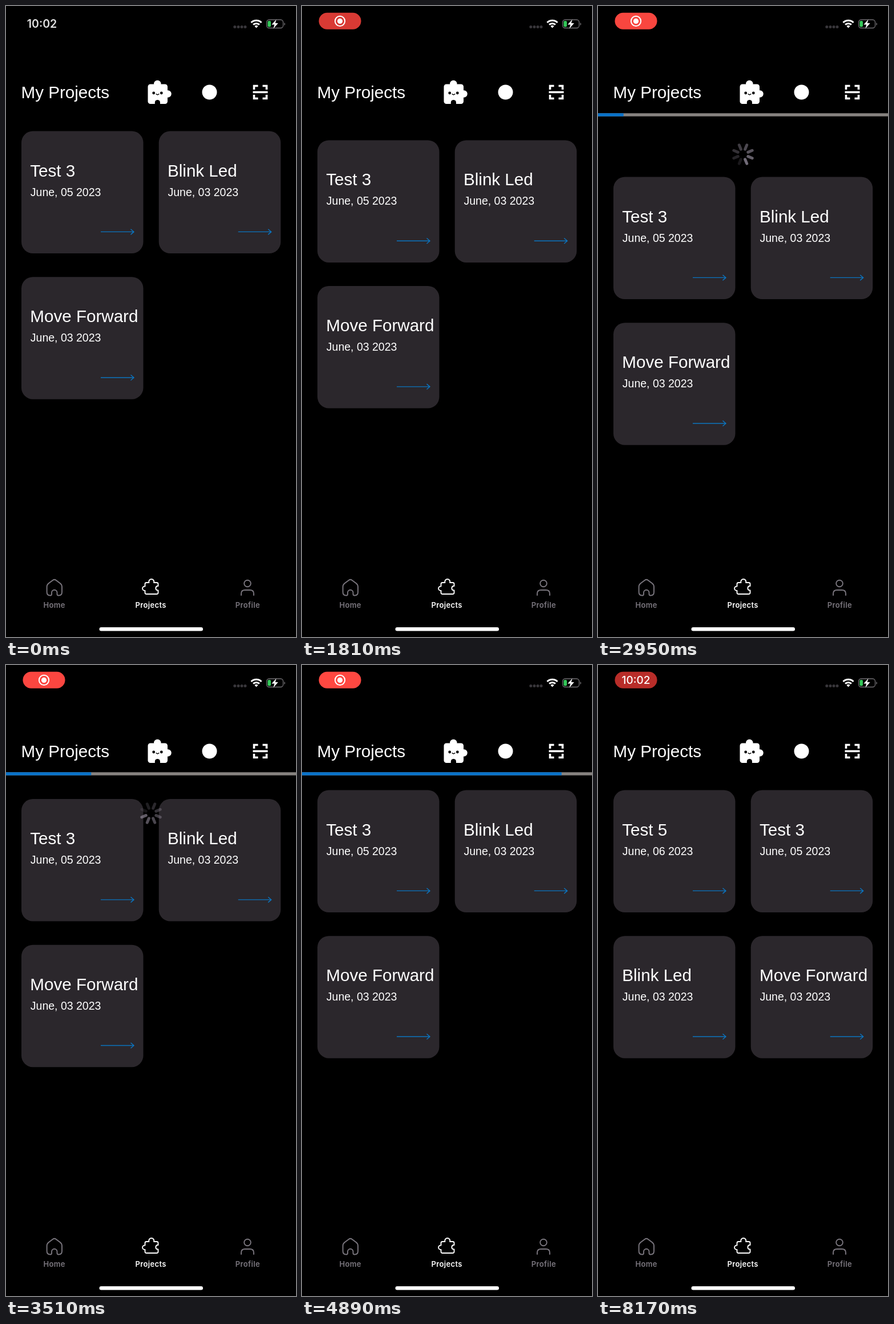
Recreate the animation shown at these times as an HTML page. Size 508 by 1102 pixels, loop 8.22 s.

```html
<!DOCTYPE html>
<html lang="en">
<head>
<meta charset="utf-8">
<title>Project list refresh</title>
<style>
  html, body { margin: 0; width: 100%; height: 100%; overflow: hidden; background: #000; }
  svg { display: block; width: 508px; height: 1102px; }
  text { fill: #fff; font-family: "Liberation Sans", Arial, sans-serif; }
  .title { font-size: 29.6px; }
  .date { font-size: 19.5px; }
  .time { font: 600 19.5px Inter, sans-serif; text-anchor: middle; }
  .tab { font: 600 13px Inter, sans-serif; letter-spacing: .35px; text-anchor: middle; }
  .line { fill: none; stroke: #fff; stroke-width: 1.9; stroke-linecap: round; stroke-linejoin: round; }
  .dim .line { stroke: #7b777f; }
  .dim text { fill: #7b777f; }
  .arrow { fill: none; stroke: #0b74bf; stroke-width: 1.4; }
</style>
</head>
<body>
<svg viewBox="0 0 508 1102">
  <!-- status bar -->
  <text id="clock" class="time" x="63" y="38" style="fill:#e2e2e2">10:02</text>
  <g id="pill">
    <rect id="pillBack" x="29.5" y="11.8" width="74" height="29" rx="14.5"/>
    <text id="pillTime" class="time" x="66.5" y="33.2" style="font-weight:500;font-size:19px">10:02</text>
    <g id="record">
      <circle cx="66.5" cy="26.4" r="8.6" fill="none" stroke="#fff" stroke-width="2"/>
      <circle cx="66.5" cy="26.4" r="4.6" fill="#fff"/>
    </g>
  </g>
  <path d="M400.8 36.4h.01M407 36.4h.01M413 36.4h.01M419 36.4h.01" stroke="#39373b" stroke-width="5" stroke-linecap="round"/>
  <g fill="none" stroke="#fff" stroke-width="3">
    <path d="M429.5 29a12.7 12.7 0 0 1 18 0"/>
    <path d="M433.1 32.6a7.7 7.7 0 0 1 10.8 0"/>
    <path d="M438.5 38.5l-3-3.2a4.3 4.3 0 0 1 6 0z" fill="#fff" stroke="none"/>
  </g>
  <rect x="456.5" y="24" width="29" height="14.5" rx="4.5" fill="none" stroke="#706e72" stroke-width="1.3"/>
  <path d="M487.3 29v5q1.7-.8 1.7-2.5t-1.7-2.5" fill="#706e72"/>
  <rect x="458.3" y="26" width="5.7" height="10.6" rx="2" fill="#34c759"/>
  <path d="M473.5 23.5l-8.2 9h5l-2 7 8.4-9.4h-5z" fill="#fff"/>

  <!-- header -->
  <text class="title" x="26.5" y="161">My Projects</text>
  <g fill="#fff">
    <rect x="248.5" y="136.5" width="34.5" height="34.5" rx="4.5"/>
    <circle cx="265.3" cy="136" r="6.2"/>
    <circle cx="283.5" cy="153.5" r="6.2"/>
    <circle cx="356.5" cy="150.5" r="13"/>
  </g>
  <path d="M260.8 172v-3.5a4.6 4.6 0 0 1 9.2 0v3.5z"/>
  <circle cx="258.7" cy="152" r="2.4"/><circle cx="272.3" cy="152" r="2.4"/>
  <path d="M263.2 153.8q2.3 2.4 4.6 0" fill="none" stroke="#000" stroke-width="1.5" stroke-linecap="round"/>
  <path d="M434.5 146v-6.5h7M449.5 139.5h7v6.5M434.5 155v6.5h7M449.5 161.5h7v-6.5M432.5 150.5h26" fill="none" stroke="#fff" stroke-width="3.6"/>

  <g id="list"></g>
  <g id="spinner" stroke="#8e8695" stroke-width="5" stroke-linecap="round"></g>
  <g id="progress">
    <rect y="187.3" width="508" height="5.4" fill="#86827f"/>
    <rect id="fill" y="187.3" height="5.4" fill="#0871c8"/>
  </g>

  <!-- tab bar -->
  <g class="dim">
    <path class="line" d="M80 1026v-1.5a4.7 4.7 0 0 1 9.5 0v2.5q0 2.5 2.5 2.5 6 0 6-6v-9q0-3.6-2.8-6l-7.4-5.6q-3-2.2-6 0l-7.4 5.6q-2.8 2.4-2.8 6v9q0 6 6 6 2.4 0 2.4-2.5z"/>
    <text class="tab" x="84.7" y="1050.5">Home</text>
    <circle class="line" cx="423" cy="1008.5" r="5.8"/>
    <path class="line" d="M412 1029v-2.5q0-6.500 6.500-6.500h9q6.500 0 6.500 6.500v2.500"/>
    <text class="tab" x="423.3" y="1050.5">Profile</text>
  </g>
  <path class="line" d="M246 1007h4.500a4.500 4.500 0 1 1 8.500 0h5q2.500 0 2.500 2.500v3.500h-1a3.800 3.800 0 0 0 0 7.500h1v4q0 2.500-2.500 2.500h-18q-2.500 0-2.500-2.500v-3.500a3.800 3.800 0 1 1 0-7.500v-4q0-2.500 2.500-2.500z"/>
  <text class="tab" x="253.7" y="1050.5">Projects</text>
  <rect x="163.5" y="1085" width="181.5" height="6.500" rx="3.250" fill="#fff"/>
</svg>
<script>
const LOOP = 8220, LOADED = 5190;
const $ = id => document.getElementById(id);
const clamp = v => Math.max(0, Math.min(1, v));
const ramp = (t, from, to) => clamp((t - from) / (to - from));
const easeOut = p => 1 - (1 - p) ** 3;

// piecewise linear value through [time, value] points
function along(t, points) {
  let value = points[0][1];
  for (let i = 1; i < points.length; i++) {
    const [t0, v0] = points[i - 1], [t1, v1] = points[i];
    if (t >= t0) value = v0 + (v1 - v0) * ramp(t, t0, t1);
  }
  return value;
}

const projects = [
  ['Test 5', '06'], ['Test 3', '05'], ['Blink Led', '03'], ['Move Forward', '03']
];

function card([name, day], i) {
  const x = 27 + (i % 2) * 240.7, y = 218.6 + (i >> 1) * 254.6;
  return `<g transform="translate(${x} ${y})">
    <rect width="213.5" height="213.5" rx="20" fill="#2b272c"/>
    <text class="title" x="15.3" y="79">${name}</text>
    <text class="date" x="15.8" y="113">June, ${day} 2023</text>
    <path class="arrow" d="M139 175.8h58M191.5 171.1l5.5 4.7-5.500 4.700"/></g>`;
}

let shown = 0;
function showCards(count) {
  if (count === shown) return;
  shown = count;
  $('list').innerHTML = projects.slice(-count).map(card).join('');
}

const petals = 8;
$('spinner').innerHTML = Array.from({ length: petals }, (_, i) =>
  `<path d="M0-9.5V-17.5" transform="rotate(${i * 45})"/>`).join('');

// pull, release to the refreshing position, then collapse
function scroll(t) {
  if (t < 2450) return along(t, [[1765, 0], [1810, 15.4], [2000, 100], [2200, 160], [2250, 162]]);
  if (t < 3195) return 162 - 82 * easeOut(ramp(t, 2450, 2900));
  return 80 * (1 - easeOut(ramp(t, 3195, 3945)));
}

function drawSpinner(t, offset) {
  const spinning = t >= 2450;
  const head = 3 + Math.floor((t - 2950) / 56);
  const pulled = ramp(offset, 50, 130) * petals;
  $('spinner').setAttribute('transform',
    `translate(254 259) rotate(${4.5 + 18 * ramp(t, 2250, 2450)})`);
  $('spinner').style.opacity = t < 1765 ? 0 :
    along(t, [[2450, 1], [2950, .8], [3510, .68], [3800, 0]]);
  [...$('spinner').children].forEach((petal, i) => {
    const age = (((head - i) % petals) + petals) % petals;
    petal.style.opacity = spinning ? 1 - age * .11 : clamp(pulled - i);
  });
}

function drawPill(t) {
  const icon = ramp(t, 500, 650) * (1 - ramp(t, 7750, 7900));
  const shade = along(t, [[0, .3], [1810, .47], [2250, .47], [2950, .92], [4890, 1], [7700, 1], [8100, 0]]);
  const [r, g, b] = [[184, 255], [45, 72], [41, 65]].map(([lo, hi]) => lo + (hi - lo) * shade);
  $('pillBack').style.fill = `rgb(${r},${g},${b})`;
  $('pill').style.opacity = ramp(t, 20, 250);
  $('clock').style.opacity = 1 - ramp(t, 20, 150);
  $('record').style.opacity = icon;
  $('pillTime').style.opacity = 1 - icon;
}

function draw(t) {
  const offset = scroll(t);
  showCards(t < LOADED ? 3 : 4);
  $('list').setAttribute('transform', `translate(0 ${offset})`);
  drawSpinner(t, offset);
  drawPill(t);
  $('progress').style.display = t >= 2180 && t < LOADED ? '' : 'none';
  $('fill').setAttribute('width',
    along(t, [[2712, 0], [2950, 44.5], [3510, 149], [4890, 454.5], [5140, 508]]));
}

const start = performance.now();
function frame() {
  draw((performance.now() - start) % LOOP);
  requestAnimationFrame(frame);
}
draw(0);
requestAnimationFrame(frame);
</script>
</body>
</html>
```
